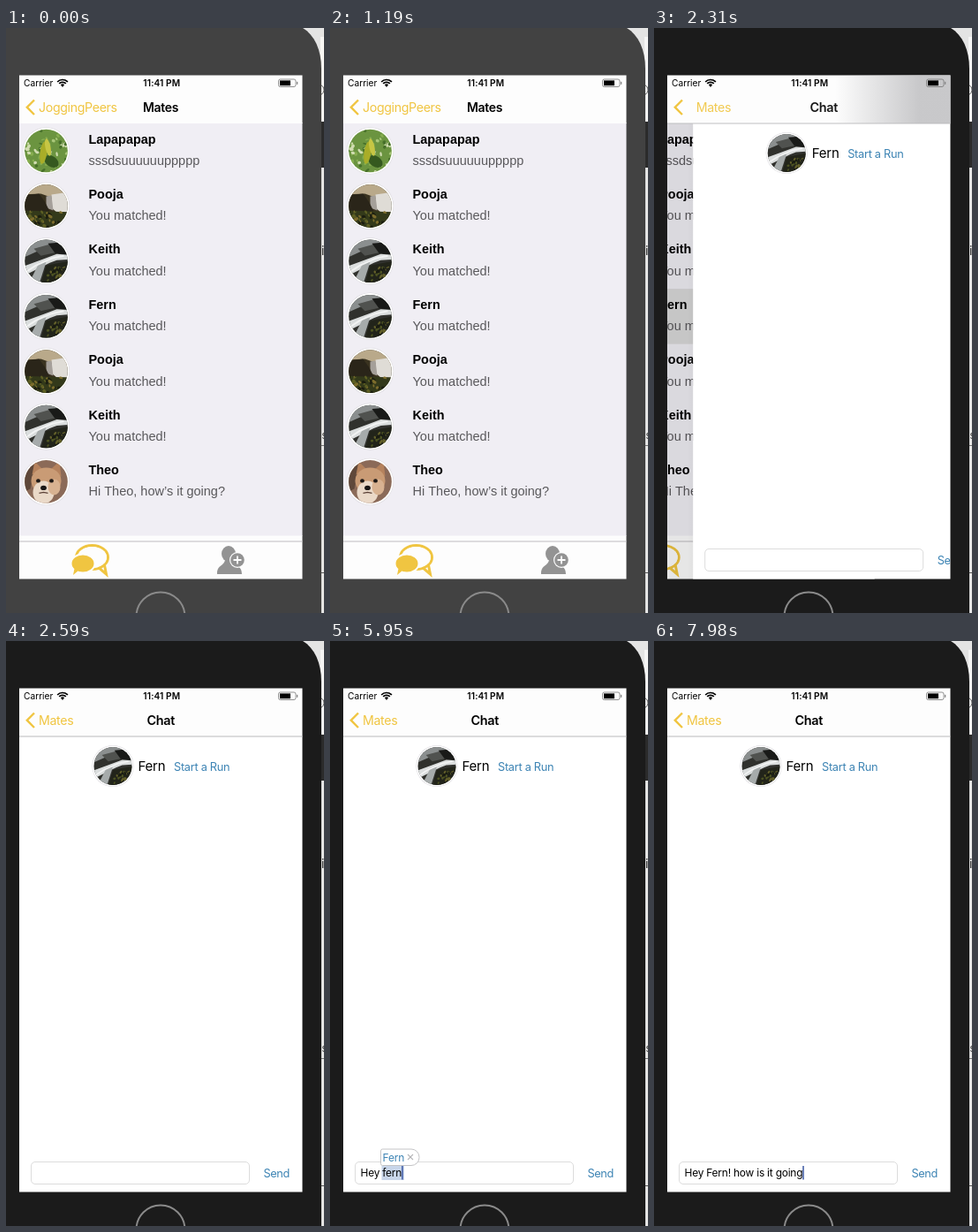
Recreate the animation shown at these times as an HTML page with a canvas. Size 360 by 662 pixels, loop 8000 ms.

```html
<!DOCTYPE html>
<html lang="en">
<head>
<meta charset="utf-8">
<title>Chat</title>
<style>
html, body { margin: 0; width: 100%; height: 100%; overflow: hidden; background: #e6e6e6; }
canvas { display: block; width: 360px; height: 662px; }
</style>
</head>
<body>
<canvas id="stage"></canvas>
<script>
const W = 360, H = 662, LOOP = 8000, STEP = 70;
const UI = 'Inter, sans-serif', ROW = '"Liberation Sans", Arial, sans-serif';
const YELLOW = '#f0c541', BLUE = '#3d84b4', LIST_BG = '#f0eef4';
const SCREEN = { x: 15, y: 53.5, w: 320.5, h: 570 };

const canvas = document.getElementById('stage');
const c = canvas.getContext('2d');
const dpr = window.devicePixelRatio || 1;
canvas.width = W * dpr;
canvas.height = H * dpr;

const mates = [
  ['Lapapapap', 'sssdsuuuuuuppppp', 'leaf'],
  ['Pooja', 'You matched!', 'falls'],
  ['Keith', 'You matched!', 'stream'],
  ['Fern', 'You matched!', 'stream'],
  ['Pooja', 'You matched!', 'falls'],
  ['Keith', 'You matched!', 'stream'],
  ['Theo', 'Hi Theo, how’s it going?', 'pup']
];
const ROW_H = 62.4, PICKED = 3;

const MESSAGE = 'Hey Fern! how is it going';
const KEYS = [4830, 4970, 5110, 5250, 5390, 5600, 5740, 5810, 6090, 6230,
  6370, 6440, 6580, 6720, 6860, 6930, 7070, 7140, 7280, 7350,
  7560, 7630, 7700, 7840, 7980];

function rect(x, y, w, h, color) {
  c.fillStyle = color;
  c.fillRect(x, y, w, h);
}

function poly(color, ...p) {
  c.fillStyle = color;
  c.beginPath();
  for (let i = 0; i < p.length; i += 2) c.lineTo(p[i], p[i + 1]);
  c.fill();
}

function ell(color, x, y, rx, ry = rx, turn = 0) {
  c.fillStyle = color;
  c.beginPath();
  c.ellipse(x, y, rx, ry, turn, 0, 7);
  c.fill();
}

function line(color, width, ...p) {
  c.strokeStyle = color;
  c.lineWidth = width;
  c.beginPath();
  for (let i = 0; i < p.length; i += 2) c.lineTo(p[i], p[i + 1]);
  c.stroke();
}

function text(s, x, y, size, { color = '#000', weight = 400, font = UI, gap = 0, align = 'left', alpha = 1 } = {}) {
  c.save();
  c.globalAlpha *= alpha;
  c.font = `${weight} ${size}px ${font}`;
  c.letterSpacing = gap + 'px';
  c.textAlign = align;
  c.fillStyle = color;
  c.fillText(s, x, y);
  const w = c.measureText(s).width;
  c.restore();
  return w;
}

function within(path, draw) {
  c.save();
  c.beginPath();
  path();
  c.clip();
  draw();
  c.restore();
}

// Scattered specks from a small seeded generator
function specks(n, seed, x, y, w, h, colors) {
  const rnd = () => (seed = seed * 16807 % 2147483647) / 2147483647;
  for (let i = 0; i < n; i++) {
    ell(colors[i % colors.length], x + rnd() * w, y + rnd() * h, 1 + rnd() * 2, 0.7 + rnd() * 1.4, rnd() * 3);
  }
}

const photos = {
  leaf() {
    rect(-26, -26, 52, 52, '#6b9440');
    specks(70, 11, -26, -26, 52, 52, ['#a9c779', '#47702a', '#86ad4f', '#d0dcb0']);
    ell('#35591f', 6, 12, 9, 6, 0.6);
    ell('#a9ad28', -3, 2, 4, 13, 0.15);
    ell('#c6c644', 2, -4, 3, 10, -0.2);
  },
  falls() {
    rect(-26, -26, 52, 52, '#3a3320');
    poly('#b9a98a', -26, -26, 26, -26, 26, -4, 8, -9, -6, -14, -26, -13);
    poly('#dfdcd6', 6, -13, 20, -15, 26, -12, 26, 7, 12, 7, 6, 2);
    poly('#a5a09a', 0, -11, 6, -12, 8, 5, 0, 2);
    poly('#2a2519', -26, -12, -8, -14, -1, -4, 4, 6, -26, 12);
    poly('#33391a', -26, 5, 26, 7, 26, 26, -26, 26);
    specks(40, 29, -24, 5, 48, 20, ['#5d5f23', '#1b1d10', '#7c6c2c']);
  },
  stream() {
    rect(-26, -26, 52, 52, '#30312d');
    poly('#8b8f8f', -26, -26, 18, -26, 6, -17, -8, -12, -26, -4);
    poly('#50524f', -14, -14, 4, -19, 12, -10, -6, -6);
    poly('#191a18', 2, -20, 26, -22, 26, -7, 10, -9);
    poly('#dadddd', 26, -7, 12, -8, -4, -2, -26, 6, -26, 17, -8, 8, 4, 2, 12, -1, 26, -2);
    poly('#a6abab', -8, 2, 0, 1, -8, 26, -18, 22);
    poly('#22241a', 0, 5, 26, 0, 26, 26, -6, 26);
    specks(26, 7, 2, 5, 20, 18, ['#4d5322', '#191b12', '#63602a']);
    line('#f2f3f3', 2, 20, -6, 6, -3, -12, 5, -24, 13);
  },
  pup() {
    rect(-26, -26, 52, 52, '#8b6a58');
    poly('#5f483a', -26, -26, -10, -26, -18, 8, -26, 12);
    poly('#b5825d', -16, -8, -13, -23, -3, -13);
    poly('#b5825d', 5, -14, 15, -23, 17, -6);
    ell('#c99b75', 0, -1, 17, 15);
    ell('#ead9c8', -3, 12, 12, 13);
    ell('#d8b291', 9, 6, 7, 9);
    ell('#1d1815', -9, -1, 2.4, 2.2);
    ell('#1d1815', 6, -1, 2.4, 2.2);
    ell('#1a1716', -3, 7, 3.4, 2.6);
    line('#5b4036', 1.2, -8, 13, -3, 12, 2, 13);
  }
};

function avatar(x, y, r, kind) {
  c.save();
  c.translate(x, y);
  c.scale(r / 26, r / 26);
  ell('#d9d7dc', 0, 0, 26.6);
  ell('#fff', 0, 0, 26.1);
  within(() => c.arc(0, 0, 24.3, 0, 7), photos[kind]);
  c.restore();
}

function bubble(x, y, rx, ry, tailX, tailY) {
  c.beginPath();
  c.ellipse(x, y, rx, ry, 0, 0, 7);
  c.moveTo(x + tailX * 0.4, y + ry * 0.8);
  c.lineTo(x + tailX, y + tailY);
  c.lineTo(x + tailX * 0.85, y + ry * 0.5);
}

function tabBar() {
  rect(15, 574.5, 322, 50, '#fdfdfd');
  rect(15, 580.5, 322, 1, '#bdbcc0');
  c.lineWidth = 3;
  c.strokeStyle = c.fillStyle = YELLOW;
  bubble(97.5, 599, 18, 13.5, 16, 19);
  c.stroke();
  ell('#fdfdfd', 97.5, 599, 16.5, 12);
  ell('#fdfdfd', 87, 606, 14.5, 11.5);
  c.fillStyle = YELLOW;
  bubble(87, 606, 12.5, 9.5, -11, 13);
  c.fill();

  const gray = '#939393';
  ell(gray, 252, 595, 8, 9);
  c.fillStyle = gray;
  c.beginPath();
  c.moveTo(239, 618);
  c.bezierCurveTo(239, 607, 246, 610, 248, 602);
  c.lineTo(257, 602);
  c.bezierCurveTo(258, 610, 267, 607, 267, 618);
  c.fill();
  ell('#fdfdfd', 262, 602, 9);
  ell(gray, 262, 602, 7.8);
  line('#fdfdfd', 1.8, 257.5, 602, 266.5, 602);
  line('#fdfdfd', 1.8, 262, 597.5, 262, 606.5);
}

function listView(picked) {
  rect(15, 107, 322, 468, LIST_BG);
  if (picked) rect(15, 108 + PICKED * ROW_H, 322, ROW_H, '#d9d9d9');
  mates.forEach(([name, note, photo], i) => {
    const y = 108 + i * ROW_H;
    avatar(45.5, y + 31, 26, photo);
    text(name, 93.5, y + 22.5, 14.4, { weight: 700, font: ROW });
    text(note, 93.5, y + 47, 14.5, { font: ROW, color: '#59585b' });
  });
  tabBar();
}

function caret(x, alpha) {
  c.globalAlpha = alpha;
  rect(x, 594, 1.5, 15.5, '#3c58a4');
  c.globalAlpha = 1;
}

function caretAlpha(t) {
  if (t < 3710) return 0;
  if (t < 4060) return 1;
  if (t < 4270) return Math.max(0, 1 - (t - 3990) / 210);
  return t < 4550 ? 0 : 1;
}

function inputField(t) {
  c.beginPath();
  c.roundRect(28.5, 589.5, 247, 25, 4.5);
  c.fillStyle = '#fff';
  c.fill();
  c.strokeStyle = '#dcdcdc';
  c.lineWidth = 1;
  c.stroke();
  text('Send', 291.5, 607, 12.8, { color: BLUE, gap: -0.4 });

  const style = { gap: -0.2 };
  const count = KEYS.filter(k => k <= t).length;
  let s = MESSAGE.slice(0, count);
  if (count < 9) s = s.replace('F', 'f');

  const hint = t >= 5950 && t < 6090;
  if (hint) {
    rect(58.5, 594, 25.5, 16, '#c9d6ea');
    c.beginPath();
    c.roundRect(57.5, 575, 43.5, 18.5, [2, 9, 9, 2]);
    c.fillStyle = '#fff';
    c.fill();
    c.strokeStyle = '#c4c4c6';
    c.stroke();
    text('Fern', 59.5, 588.5, 12, { color: BLUE, gap: -0.2 });
    line('#b5b5b8', 1.1, 88, 581, 94, 587);
    line('#b5b5b8', 1.1, 94, 581, 88, 587);
  }
  const w = text(s, 34.5, 606, 11.9, style);
  caret(34.5 + w, caretAlpha(t));
}

function chatView(t) {
  rect(15, 108, 322, 517, '#fff');
  avatar(121, 141.5, 23, 'stream');
  text('Fern', 149.5, 147, 15, { gap: -0.2 });
  text('Start a Run', 190, 146.5, 12.8, { color: BLUE, gap: -0.3 });
  inputField(t);
}

function navBar(p) {
  rect(15, 53, 322, 55, '#fdfdfd');
  if (p > 0 && p < 0.995) {
    const g = c.createLinearGradient(205, 0, 300, 0);
    g.addColorStop(0, 'rgba(200,200,202,0)');
    g.addColorStop(1, 'rgba(200,200,202,1)');
    c.globalAlpha = Math.min(1, 4 * p * (1 - p) * 3);
    rect(205, 53, 132, 55, g);
    c.globalAlpha = 1;
  }
  if (p > 0) {
    c.globalAlpha = p;
    rect(15, 107.5, 322, 1, '#b9b9bb');
    c.globalAlpha = 1;
  }

  c.lineCap = 'butt';
  line(YELLOW, 2.4, 32, 81.5, 23.8, 89.7, 32, 98);
  const label = { color: YELLOW, gap: -0.35 };
  const title = { weight: 600, gap: -0.35 };
  const slide = 37 + 118 * (1 - p);
  if (p < 1) {
    const fade = Math.max(0, 1 - p * 1.6);
    text('JoggingPeers', 37 - 118 * p, 94.5, 14.2, { ...label, alpha: fade });
    text('Mates', slide, 94.5, 14, { ...title, alpha: fade });
  }
  if (p > 0) {
    text('Mates', slide, 94.5, 14.2, { ...label, alpha: p });
    text('Chat', 175.2 + 187 * (1 - p), 94.5, 14.4, { ...title, align: 'center', alpha: p });
  }
}

function statusBar() {
  text('Carrier', 20, 66, 10.2);
  text('11:41 PM', 176.3, 66, 10.2, { weight: 600, align: 'center', gap: 0.1 });
  c.strokeStyle = '#000';
  c.lineWidth = 1.7;
  for (const r of [8, 5.2]) {
    c.beginPath();
    c.arc(64, 66.5, r, -Math.PI * 0.76, -Math.PI * 0.24);
    c.stroke();
  }
  poly('#000', 64, 67, 61.8, 64, 64, 63.2, 66.2, 64);
  c.beginPath();
  c.roundRect(308.5, 58, 19.5, 8.5, 2);
  c.lineWidth = 0.8;
  c.strokeStyle = '#777';
  c.stroke();
  rect(310, 59.4, 12, 5.8, '#000');
  rect(329, 60.8, 1.3, 3, '#888');
}

function desktop() {
  rect(0, 0, W, H, '#e4e4e4');
  rect(356, 10, 4, 95, '#f5f5f5');
  rect(356, 106, 4, 52, '#2b2b2b');
  text('i', 357, 257, 14, { color: '#222' });
  text('s', 357.5, 465, 11, { color: '#333' });
  line('#777', 1, 356, 472.5, 360, 472.5);
  line('#555', 1, 356, 616.5, 360, 616.5);
  c.strokeStyle = '#555';
  c.beginPath();
  c.arc(354, 70, 6, -1.1, 1.1);
  c.stroke();
}

function phone(color) {
  c.fillStyle = color;
  c.beginPath();
  c.moveTo(0, 0);
  c.lineTo(336, 0);
  c.bezierCurveTo(349, 8, 357, 24, 357, 46);
  c.lineTo(357, H);
  c.lineTo(0, H);
  c.fill();
  c.strokeStyle = '#8a8a8a';
  c.lineWidth = 2;
  c.beginPath();
  c.arc(175, 666, 27.5, 0, 7);
  c.stroke();
}

function draw(t) {
  const dt = t - 2170;
  let p = dt < 0 ? 0 : 1 - Math.exp(-Math.pow(dt / 75, 1.4));
  if (p > 0.999) p = 1;

  c.setTransform(dpr, 0, 0, dpr, 0, 0);
  desktop();
  phone(t < 1400 ? '#424242' : '#1b1b1b');
  within(() => c.rect(SCREEN.x, SCREEN.y, SCREEN.w, SCREEN.h), () => {
    if (p < 1) {
      c.save();
      c.translate(-96 * p, 0);
      listView(t >= 2100);
      c.restore();
      rect(15, 108, 321, 516, `rgba(0,0,0,${0.1 * p})`);
    }
    if (dt >= 0) {
      const x = 320.5 * (1 - p);
      if (p < 1) {
        const g = c.createLinearGradient(x + 8, 0, x + 15, 0);
        g.addColorStop(0, 'rgba(0,0,0,0)');
        g.addColorStop(1, `rgba(0,0,0,${0.22 * (1 - p)})`);
        rect(x + 8, 108, 7, 516, g);
      }
      c.save();
      c.translate(x, 0);
      chatView(t);
      c.restore();
    }
    navBar(p);
    statusBar();
  });
}

const start = performance.now();
function tick() {
  const t = (performance.now() - start) % LOOP;
  draw(Math.floor(t / STEP) * STEP);
  requestAnimationFrame(tick);
}
tick();
</script>
</body>
</html>
```
